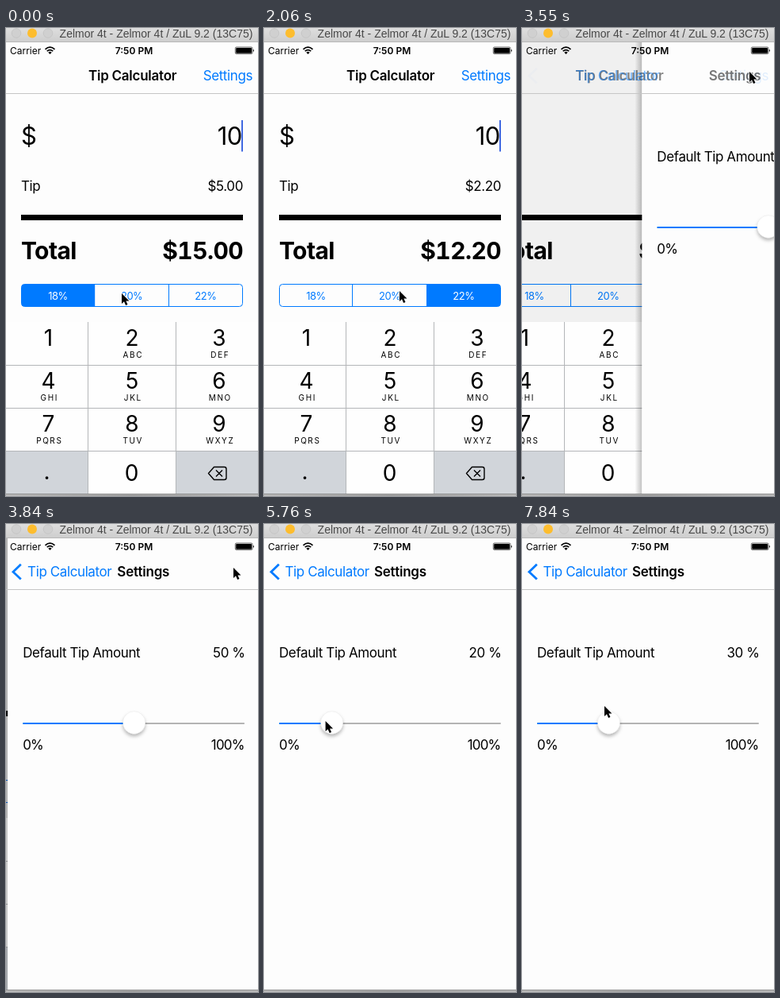
An HTML page for the animation above (7990 ms loop, 318 by 589 pixels).

```html
<!DOCTYPE html>
<html lang="en">
<head>
<meta charset="utf-8">
<title>Tip calculator</title>
<style>
  html, body { margin: 0; width: 100%; height: 100%; overflow: hidden; background: #fdfdfd; }
  svg { display: block; width: 100%; height: 100%; }
  text { font: 17px Inter, sans-serif; letter-spacing: -.4px; white-space: pre; }
  .blue { fill: #007aff; }
  .bold { font-weight: 600; letter-spacing: -.25px; }
  .status { font-size: 12px; letter-spacing: 0; }
  .amount { font-size: 31px; }
  .total { font-size: 30px; font-weight: 700; letter-spacing: -.6px; font-feature-settings: "tnum"; }
  .percent { letter-spacing: -.8px; }
  .segment { font-size: 13px; letter-spacing: -.5px; }
  .digit { font-size: 28px; letter-spacing: 0; }
  .letters { font-size: 10px; letter-spacing: 1.6px; }
  .window { font: 14px "Liberation Sans", Arial, sans-serif; letter-spacing: 0; fill: #484848; }
  .end { text-anchor: end; }
  .mid { text-anchor: middle; }
</style>
</head>
<body>
<svg viewBox="0 0 318 589">
  <defs>
    <linearGradient id="barFill" x2="0" y2="1"><stop stop-color="#dedede"/><stop offset="1" stop-color="#cdcdcd"/></linearGradient>
    <linearGradient id="edgeFill"><stop stop-opacity="0"/><stop offset="1" stop-opacity=".24"/></linearGradient>
    <linearGradient id="bottomFill">
      <stop stop-color="#b8b8b8"/><stop offset=".5" stop-color="#949494"/><stop offset="1" stop-color="#b8b8b8"/>
    </linearGradient>
    <filter id="thumbShadow" x="-50%" y="-50%" width="200%" height="200%">
      <feDropShadow dx="0" dy="3" stdDeviation="2" flood-opacity=".28"/>
    </filter>
    <clipPath id="control"><rect x="19.5" y="322.5" width="279" height="28" rx="4"/></clipPath>
  </defs>
  <rect width="318" height="589" fill="#fdfdfd"/>

  <g id="calculator">
    <text class="amount" x="19" y="147">$</text>
    <text class="amount end" x="298" y="147">10</text>
    <rect id="caret" x="297" y="116" width="2" height="39.5" fill="#4169e1"/>
    <text x="19" y="204.5">Tip</text>
    <text id="tip" class="end" x="299" y="204.5"/>
    <rect x="19" y="235" width="280" height="7"/>
    <text class="total" x="19" y="291">Total</text>
    <text id="total" class="total end" x="299" y="291"/>
    <g id="segments" clip-path="url(#control)"></g>
    <path d="M111.5 323V350M205.5 323V350" stroke="#007aff"/>
    <rect x="19.5" y="322.5" width="279" height="28" rx="4" fill="none" stroke="#007aff"/>
  </g>
  <rect id="dim" y="18" width="318" height="352"/>

  <g id="keypad">
    <rect y="370" width="318" height="216" fill="#fefefe"/>
    <path d="M0 532H103V586H0ZM215 532H318V586H215Z" fill="#d1d5da"/>
    <path d="M103.5 370V586M214.5 370V586M0 424.5H318M0 478.5H318M0 532.5H318" stroke="#b4b6b9"/>
    <g id="keys"></g>
    <path d="M262.5 552.5H275.5Q278 552.5 278 555V566Q278 568.5 275.5 568.5H262.5L255.5 560.5ZM265 556.5L273 564.5M273 556.5L265 564.5"
      fill="none" stroke="#000" stroke-width="1.4" stroke-linejoin="round"/>
  </g>

  <g id="settings">
    <rect x="-9" y="18" width="9" height="568" fill="url(#edgeFill)"/>
    <rect y="18" width="318" height="568" fill="#fdfdfd"/>
    <text x="19" y="167.5">Default Tip Amount</text>
    <text id="percent" class="end" x="299.5" y="167.5"/>
    <rect x="19" y="250" width="280" height="2" rx="1" fill="#b4b4b4"/>
    <rect id="track" x="19" y="250" height="2" rx="1" class="blue"/>
    <circle id="thumb" cy="250" r="14.2" fill="#fff" stroke="#000" stroke-opacity=".1" stroke-width=".5" filter="url(#thumbShadow)"/>
    <text class="percent" x="19" y="283.5">0%</text>
    <text class="percent end" x="298.5" y="283.5">100%</text>
  </g>

  <g id="navigation">
    <rect y="82" width="318" height="1" fill="#c6c6c6"/>
    <path id="chevron" d="M18.8 50.8L9 60.2L18.8 69.6" fill="none" stroke="#007aff" stroke-width="2.8"/>
    <g id="backTitle">
      <text id="titleBlack" class="bold" y="66">Tip Calculator</text>
      <text id="titleBlue" class="blue" y="66">Tip Calculator</text>
    </g>
    <text id="button" class="blue end" x="311" y="66">Settings</text>
    <text id="settingsTitle" class="bold" y="66">Settings</text>
  </g>

  <text class="status" x="5" y="32.5">Carrier</text>
  <g fill="none" stroke="#000" stroke-width="1.7">
    <path d="M49.5 26.8Q55.5 21.4 61.5 26.8M51.7 29.2Q55.5 25.9 59.3 29.2"/>
    <path d="M53.3 30.7Q55.5 29 57.7 30.7L55.5 33Z" fill="#000" stroke="none"/>
  </g>
  <text class="status bold mid" x="161.5" y="32.5">7:50 PM</text>
  <rect x="289.3" y="24" width="21.7" height="8.6" rx="1.6" fill="none" stroke="#000" stroke-width=".6"/>
  <rect x="290.2" y="24.9" width="19.9" height="6.8" rx=".8"/>
  <path d="M311.8 26.7Q314 28.3 311.8 29.9Z"/>

  <rect width="318" height="18" fill="url(#barFill)"/>
  <rect y="17" width="318" height="1" fill="#b8b8b8"/>
  <g fill="#d0d0d0" stroke="#bcbcbc" stroke-width=".6">
    <circle cx="13" cy="6.5" r="5.8"/>
    <circle cx="33" cy="6.5" r="6" fill="#fdbd2e" stroke="none"/>
    <circle cx="53" cy="6.5" r="5.8"/>
  </g>
  <text class="window mid" x="189.5" y="12">Zelmor 4t - Zelmor 4t / ZuL 9.2 (13C75)</text>
  <rect y="586" width="318" height="1.5" fill="#8c8c8c"/>
  <rect y="587.5" width="318" height="1.5" fill="url(#bottomFill)"/>

  <path id="cursor" d="M0 0V13L3 10.3L5.1 15L7.5 14L5.4 9.4H9.5Z" stroke="#fff" stroke-width="1.4" paint-order="stroke"/>
</svg>
<script>
const LOOP = 7990, STEP = 147.9; // the screen refreshes once per STEP ms
const TRACK_START = 33.5, TRACK_LENGTH = 251;
const TAPS = [140, 1320];        // taps on the second and third segment
const PUSH_START = 3440, PUSH_TIME = 500;

const $ = id => document.getElementById(id);
const set = (id, attrs) => { for (const name in attrs) $(id).setAttribute(name, attrs[name]); };
const moveTo = (id, x, y = 0) => set(id, { transform: `translate(${x} ${y})` });
const clamp = v => Math.min(1, Math.max(0, v));

function ease(t, start, end) {
  const u = clamp((t - start) / (end - start));
  return u * u * (3 - 2 * u);
}

// Each move is [start ms, end ms, destination].
const glide = (t, from, moves) =>
  moves.reduce((v, [start, end, to]) => v + (to - v) * ease(t, start, end), from);

const thumbX = t => glide(t, 159.5, [[4720, 5380, 50], [5380, 5930, 95], [6400, 7000, 109.5]]);

function cursorAt(t) {
  const dragX = thumbX(t) + glide(t, 9, [[4720, 5380, -8]]);
  return [
    glide(t, 146, [[450, 1020, 240], [1500, 2050, 171], [2070, 2440, 287], [3850, 4420, 168.5],
      [4700, 4720, dragX], [7690, 7840, 104]]),
    glide(t, 334, [[450, 1020, 341], [1500, 2050, 331], [2070, 2440, 55], [3850, 4420, 250.5],
      [4720, 5380, 248], [7690, 7840, 229]])
  ];
}

const SEGMENTS = [0, 1, 2];
$('segments').innerHTML = SEGMENTS.map(i => {
  const x = 19 + 93.2 * i;
  return `<rect id="seg${i}" x="${x}" y="322" width="93.2" height="29" class="blue"/>
    <text id="label${i}" class="segment mid" x="${x + 46.5}" y="341.5">${18 + 2 * i}%</text>`;
}).join('');

const keyLetters = ['', 'ABC', 'DEF', 'GHI', 'JKL', 'MNO', 'PQRS', 'TUV', 'WXYZ'];
const columns = [53.5, 159, 269];
const digit = (x, y, label) => `<text class="digit mid" x="${x}" y="${y}">${label}</text>`;
$('keys').innerHTML = keyLetters.map((letters, i) => {
  const x = columns[i % 3], y = 400 + 54 * Math.floor(i / 3);
  return digit(x, y, i + 1) + `<text class="letters mid" x="${x + 1.3}" y="${y + 15.3}">${letters}</text>`;
}).join('') + digit(51.5, 568, '.') + digit(158.5, 569.5, 0);

function drawCalculator(t) {
  const pressed = TAPS.filter(tap => t >= tap).length;
  const selected = TAPS.filter(tap => t >= tap + STEP).length;
  // The first amount still uses the 50 % default.
  const tip = 10 * (selected ? .18 + .02 * selected : .5);
  $('tip').textContent = '$' + tip.toFixed(2);
  $('total').textContent = '$' + (10 + tip).toFixed(2);
  for (const i of SEGMENTS) {
    set('seg' + i, { 'fill-opacity': i === selected ? 1 : i === pressed ? .15 : 0 });
    set('label' + i, { fill: i === selected ? '#fff' : '#007aff' });
  }
  set('caret', { opacity: clamp(1.2 + 2 * Math.sin(t * 2 * Math.PI / 1000)) });
}

function drawPush(t) {
  const p = 1 - (1 - clamp((t - PUSH_START) / PUSH_TIME)) ** 3;
  const press = t < 2950 ? 1 : .25 + .75 * ease(t, 2950, 3250);
  moveTo('calculator', -95.4 * p);
  moveTo('keypad', -95.4 * p);
  moveTo('settings', p ? 318 * (1 - p) : 340);
  set('dim', { opacity: .1 * p });
  moveTo('backTitle', 104 - 77.5 * p ** 1.15);
  set('titleBlack', { opacity: 1 - p });
  set('titleBlue', { opacity: p });
  set('chevron', { opacity: p ** 6 });
  set('button', { opacity: (1 - p) ** 3 * press });
  set('settingsTitle', { x: 139 + 203 * (1 - p), opacity: p });
}

function drawSlider(t) {
  const x = thumbX(t);
  set('thumb', { cx: x });
  set('track', { width: x - 19 });
  $('percent').textContent = Math.floor(100 * (x - TRACK_START) / TRACK_LENGTH) + ' %';
}

function draw(now) {
  const t = Math.floor((now % LOOP + 16) / STEP) * STEP;
  drawCalculator(t);
  drawPush(t);
  drawSlider(t);
  moveTo('cursor', ...cursorAt(t));
  requestAnimationFrame(draw);
}
requestAnimationFrame(draw);
</script>
</body>
</html>
```
